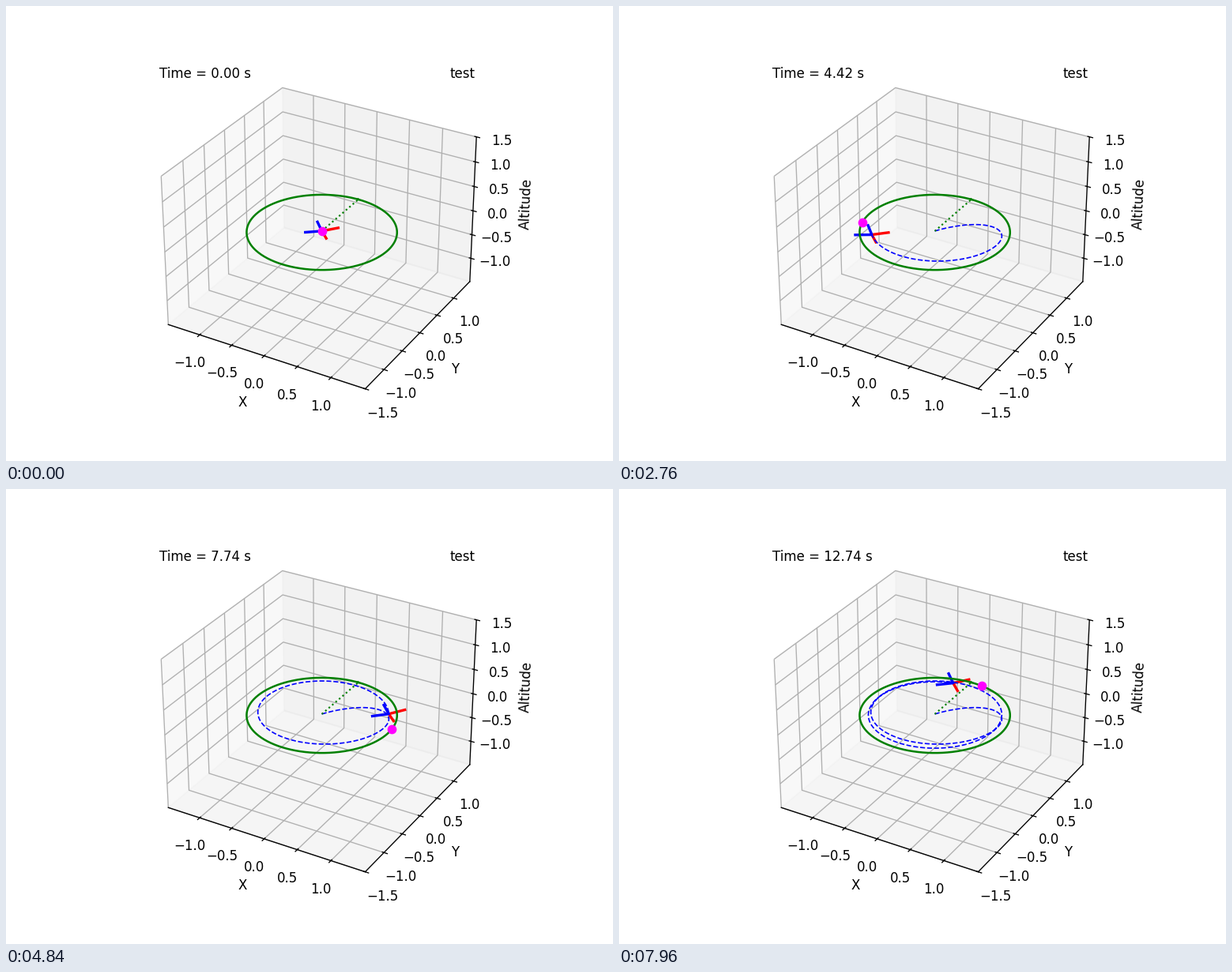
Recreate the animation shown at these times as a matplotlib script. Size 768x576 px, loop 8 s.

```python
import numpy as np
import matplotlib.pyplot as plt
from matplotlib.animation import FuncAnimation

FRAMES, INTERVAL = 200, 40
SUB, DT = 8, 0.008          # simulation steps per frame, step in seconds
ARM, ARM_Z, G = 0.16, 0.02, 9.81
RADIUS, LAG = 0.885, 0.407  # steady circle flown by the vehicle


def flown(t):
    """Circle followed with a lag, plus the start-up transient."""
    x = RADIUS * np.sin(t - LAG) + 0.35 * np.exp(-2.6 * t) * (1 + 0.28 * t)
    y = (RADIUS * np.cos(t - LAG) + 1.1 * np.exp(-0.6 * t)
         - 1.9125 * np.exp(-1.75 * t) * (1 + 1.588 * t))
    return x, y


def wanted(t):
    return (np.sin(t), np.cos(t)) if t > 0 else (0.0, 0.0)


time = np.arange(FRAMES * SUB) * DT
px, py = flown(time)
px, py = px - px[0], py - py[0]
pz = np.zeros_like(time)
ramp = 1 - np.exp(-time / 0.1)
ax_ = np.gradient(np.gradient(px, DT), DT) * ramp
ay_ = np.gradient(np.gradient(py, DT), DT) * ramp


def tilt(ax, ay):
    """Body axes as columns, with thrust along (ax, ay, g) and zero yaw."""
    up = np.array([ax, ay, G])
    up /= np.linalg.norm(up)
    left = np.cross(up, [1.0, 0.0, 0.0])
    left /= np.linalg.norm(left)
    return np.column_stack([np.cross(left, up), left, up])


def arms(side):
    return np.array([[side, -side, 0], [0, 0, 0], [side, side, 0]]) * ARM \
        + np.array([[0, 0, ARM_Z], [0, 0, 0], [0, 0, ARM_Z]])


FRONT = arms(1)
BACK = FRONT[::-1] * [-1, 1, 1]

fig = plt.figure(figsize=(6.4, 4.8), dpi=120)
ax = fig.add_subplot(projection='3d')

front, = ax.plot([], [], [], lw=2, color='red')
back, = ax.plot([], [], [], lw=2, color='blue')
trail, = ax.plot([], [], [], '--', lw=1, color='blue')
turn = np.linspace(0, 2 * np.pi, 400)
ax.plot([0, 0], [0, 1], [0, 0], ':', lw=1.3, color='green')
ax.plot(np.sin(turn), np.cos(turn), 0 * turn, lw=1.5, color='green')
goal, = ax.plot([], [], [], 'o', color='magenta')

ax.set(xlim=(-1.5, 1.5), ylim=(-1.5, 1.5), zlim=(-1.5, 1.5),
       xlabel='X', ylabel='Y', zlabel='Altitude',
       xticks=np.arange(-1, 1.1, 0.5),
       yticks=np.arange(-1.5, 1.1, 0.5),
       zticks=np.arange(-1, 1.6, 0.5))

clock = ax.text2D(0.05, 0.95, '', transform=ax.transAxes)
ax.text2D(0.95, 0.95, 'test', transform=ax.transAxes, ha='right')


def update(i):
    k = i * SUB
    pos = np.array([px[k], py[k], 0])
    rot = tilt(ax_[k], ay_[k])
    for line, pts in ((front, FRONT), (back, BACK)):
        line.set_data_3d(*(pts @ rot.T + pos).T)
    trail.set_data_3d(px[:k], py[:k], pz[:k])
    gx, gy = wanted(time[k])
    goal.set_data_3d([gx], [gy], [0])
    clock.set_text(f'Time = {time[k]:.2f} s')
    return front, back, trail, goal, clock


anim = FuncAnimation(fig, update, frames=FRAMES, interval=INTERVAL,
                     init_func=lambda: update(0), repeat=True, repeat_delay=0)
plt.show()
```
